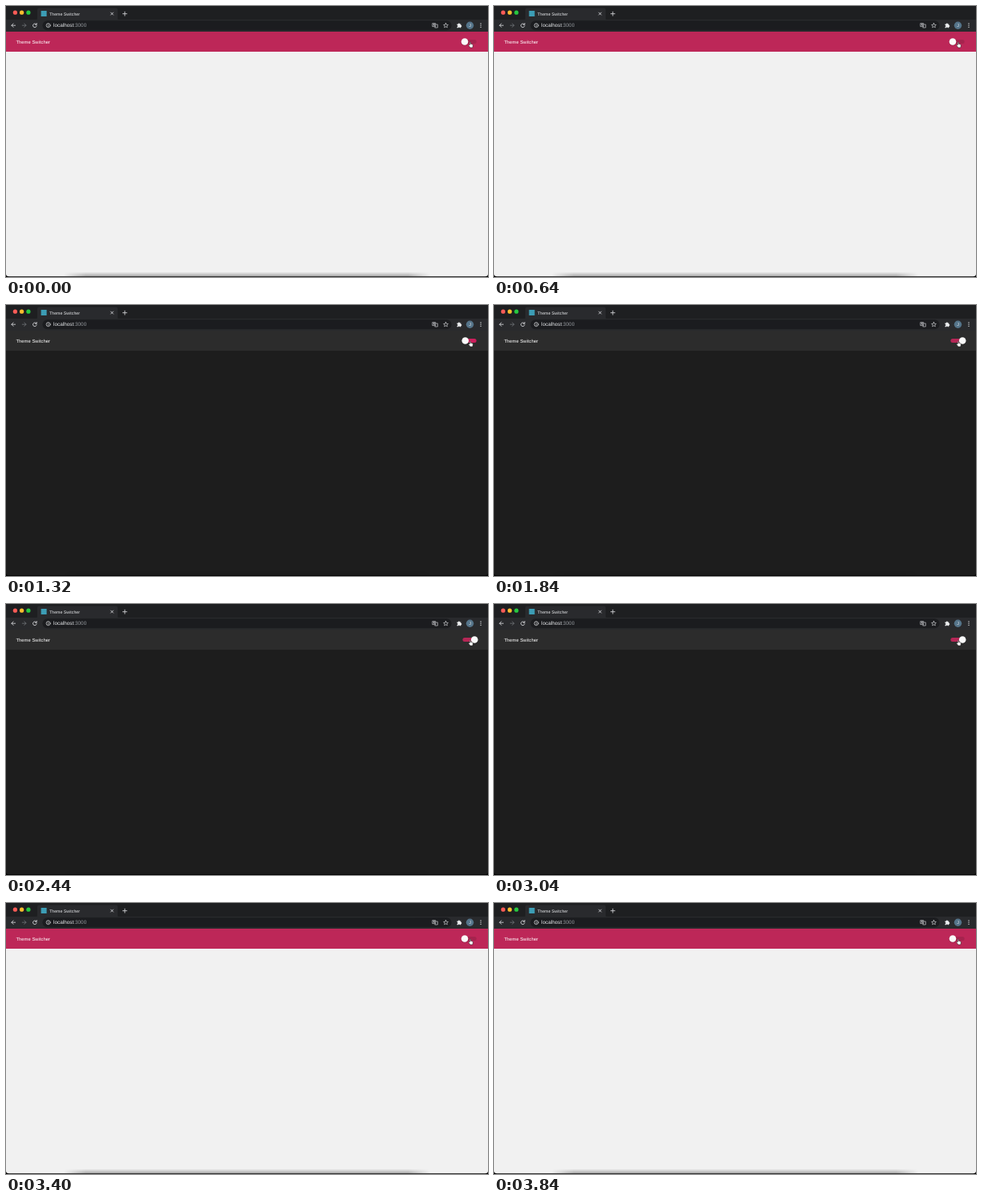
Animation of 600 by 338 pixels, one loop 3880 ms. Source, as an HTML page:

```html
<!DOCTYPE html>
<html lang="en">
<head>
<meta charset="utf-8">
<title>Theme Switcher</title>
<style>
html, body { margin: 0; width: 100%; height: 100%; overflow: hidden; background: #000; }
svg { display: block; width: 600px; height: 338px; }
text { font-family: "Liberation Sans", Arial, sans-serif; fill: #e8eaed; text-rendering: geometricPrecision; }
.icon { fill: none; stroke: #e2e4e7; stroke-width: .8; stroke-linecap: round; stroke-linejoin: round; }
</style>
</head>
<body>
<svg viewBox="0 0 600 338">
  <defs>
    <linearGradient id="fade" x1="0" y1="0" x2="0" y2="1">
      <stop offset="0" stop-color="#000" stop-opacity="0"/>
      <stop offset="1" stop-color="#000" stop-opacity=".3"/>
    </linearGradient>
    <linearGradient id="ends">
      <stop offset="0" stop-color="#000"/>
      <stop offset=".06" stop-color="#fff"/>
      <stop offset=".94" stop-color="#fff"/>
      <stop offset="1" stop-color="#000"/>
    </linearGradient>
    <mask id="soft"><rect x="72" y="330" width="456" height="8" fill="url(#ends)"/></mask>
  </defs>

  <!-- Page -->
  <path id="page" d="M0 32H600V334Q600 337.3 596.5 337.3H3.5Q0 337.3 0 334Z"/>
  <rect id="dock" x="72" y="331.5" width="456" height="5.8" fill="url(#fade)" mask="url(#soft)"/>
  <rect id="bar" y="32" width="600" height="25"/>
  <text x="12.5" y="46.7" font-size="5.88" style="fill:#fff">Theme Switcher</text>

  <!-- Tab strip -->
  <rect width="600" height="18" fill="#1e1f21"/>
  <rect y="17" width="600" height="15" fill="#292a2d"/>
  <path d="M36.5 17.5Q39 17.5 39 15V5Q39 2.5 41.5 2.5H136.5Q139 2.5 139 5V15Q139 17.5 141.5 17.5Z" fill="#292a2d"/>
  <circle cx="11.4" cy="8.2" r="2.6" fill="#fc5b57"/>
  <circle cx="19.6" cy="8.2" r="2.6" fill="#fdbc2e"/>
  <circle cx="27.9" cy="8.2" r="2.6" fill="#27c840"/>
  <rect x="43.6" y="6" width="7" height="7" fill="#3c9db5"/>
  <text x="54" y="11.5" font-size="5.27">Theme Switcher</text>
  <path class="icon" d="M130.5 8.1l3 3m0-3l-3 3M145.4 9.7h5m-2.5-2.5v5"/>

  <!-- Toolbar -->
  <rect x="45.5" y="18.2" width="509" height="12" rx="6" fill="#1b1c1f"/>
  <path class="icon" d="M11.6 24.2H7m2.1-2.2L6.9 24.2l2.2 2.2"/>
  <path class="icon" style="stroke:#73767a" d="M20.3 24.2h4.6m-2.1-2.2l2.2 2.2l-2.2 2.2"/>
  <path class="icon" d="M37.6 22.7A2.35 2.35 0 1 0 38.2 24.8M38.2 21.6v1.7h-1.7"/>
  <g class="icon" style="stroke-width:.7">
    <circle cx="52.6" cy="24.2" r="2.5"/>
    <path d="M52.6 24v1.4m0-2.6v.05"/>
  </g>
  <text x="59" y="26.3" font-size="6.4">localhost<tspan fill="#969a9f">:3000</tspan></text>
  <g class="icon" style="stroke-width:.6">
    <path d="M531.2 21.6h3.4v4h-3.4zM535.3 23h2v4h-3.6l.6-1M532 23h1.8m-.9-.5v.5q0 1-.9 1.6m.3-1.2l1.4 1.2"/>
    <path d="M547.5 21.4l.85 1.9l2.05.2l-1.55 1.35l.45 2l-1.8-1.05l-1.8 1.05l.45-2l-1.55-1.35l2.05-.2z"/>
  </g>
  <path d="M561.5 22.5h1.4a1 1 0 0 1 2 0h1.4v1.5a1 1 0 0 1 0 2v1.3h-1.4a.9.9 0 0 0-1.8 0h-1.6v-1.4a.9.9 0 0 0 0-1.8z" fill="#eceef0"/>
  <circle cx="577.5" cy="24.2" r="4.7" fill="#55748a"/>
  <text x="577.5" y="26.2" font-size="5.4" text-anchor="middle">J</text>
  <g fill="#e2e4e7">
    <circle cx="591" cy="22" r=".65"/>
    <circle cx="591" cy="24.2" r=".65"/>
    <circle cx="591" cy="26.4" r=".65"/>
  </g>

  <!-- Switch and pointer -->
  <rect id="track" x="568.4" y="42.1" width="17.2" height="5" rx="2.5"/>
  <circle id="shade" cy="45" r="4.5" fill="#000" opacity=".2"/>
  <circle id="thumb" cy="44.5" r="4.3" fill="#fafafa"/>
  <path d="M577.3 48.7V45.8Q577.3 45.1 577.9 45.1T578.5 45.8V47.4Q579.2 47.1 579.5 47.6Q580.1 47.3 580.4 47.9Q581.2 47.7 581.2 48.6V50Q581.2 51 580.6 51.9H577.8Q577.2 50.8 576 49.5Q575.6 48.8 576.2 48.4Q576.8 48.2 577.3 48.7Z"
    fill="#fff" stroke="#111" stroke-width=".5" stroke-linejoin="round"/>
</svg>
<script>
const LOOP = 3880, DARK = 1320, LIGHT = 3080, SLIDE = 150;
const ON_START = 1300, OFF_START = 3047;
const $ = id => document.getElementById(id);
const paint = (id, color) => $(id).setAttribute("fill", color);
const mix = (a, b, k) => `rgb(${a.map((v, i) => v + (b[i] - v) * k)})`;

// cubic-bezier(.4, 0, .2, 1), solved by bisection
function ease(x) {
  if (x <= 0 || x >= 1) return x <= 0 ? 0 : 1;
  let lo = 0, hi = 1, s;
  for (let i = 0; i < 20; i++) {
    s = (lo + hi) / 2;
    const at = 1.2 * s * (1 - s) ** 2 + .6 * s * s * (1 - s) + s ** 3;
    if (at < x) lo = s; else hi = s;
  }
  return s * s * (3 - 2 * s);
}

function draw(t) {
  const dark = t >= DARK && t < LIGHT;
  const on = ease((t - ON_START) / SLIDE) - ease((t - OFF_START) / SLIDE);
  // The dark theme's thumb starts sliding only once the theme has changed back.
  const slide = dark && t > DARK + SLIDE ? 1 : on;
  const x = 571 + 12.2 * slide;
  paint("page", dark ? "#1d1d1d" : "#f1f1f1");
  paint("bar", dark ? "#2c2c2c" : "#bd2758");
  paint("track", dark ? mix([205, 30, 92], [181, 39, 86], on) : mix([166, 35, 78], [189, 39, 88], on));
  $("dock").setAttribute("opacity", dark ? .3 : 1);
  $("thumb").setAttribute("cx", x);
  $("shade").setAttribute("cx", x);
}

function tick() {
  draw(performance.now() % LOOP);
  requestAnimationFrame(tick);
}
tick();
</script>
</body>
</html>
```
